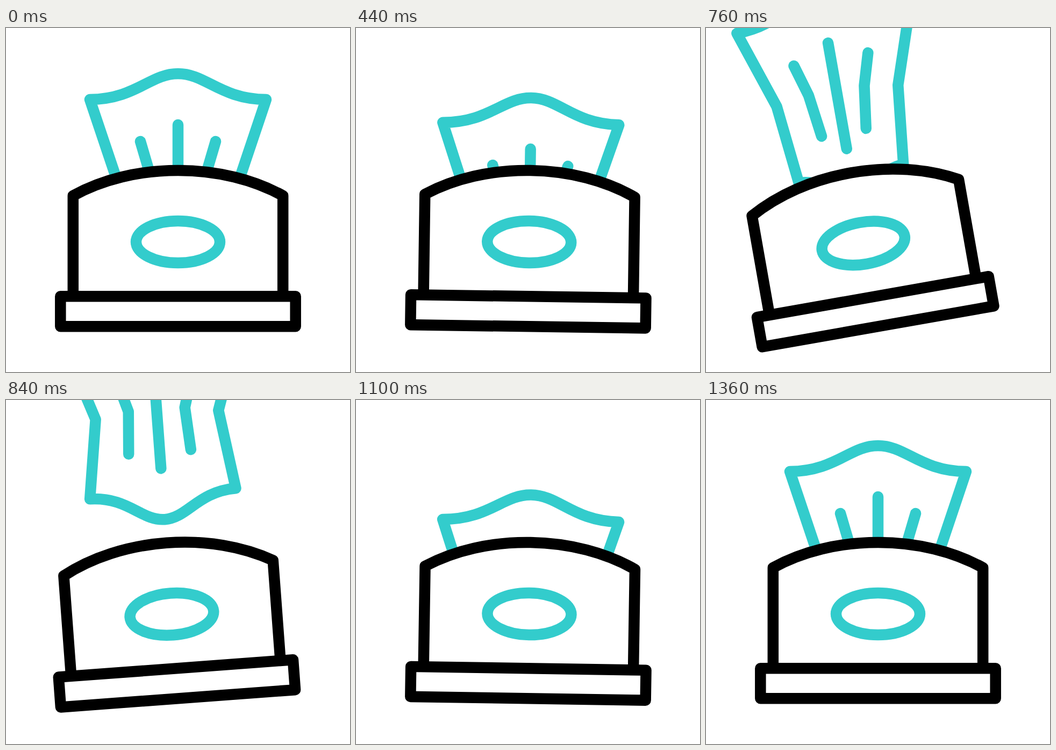
Recreate the animation shown at these times as an HTML page. Size 640x640 px, loop 1.72 s.

```html
<!DOCTYPE html>
<html lang="en">
<head>
<meta charset="utf-8">
<title>Tissue box</title>
<style>
  html, body { margin: 0; width: 100%; height: 100%; overflow: hidden; background: #fff; }
  svg { display: block; width: 100vw; height: 100vh; }
  svg * { stroke-width: 20.5; stroke-linecap: round; stroke-linejoin: round; }
  .teal { stroke: #33cccc; fill: #fff; }
  .line { stroke: #33cccc; fill: none; }
  .box { stroke: #000; fill: #fff; }
</style>
</head>
<body>
<svg viewBox="0 0 640 640">
  <defs>
    <clipPath id="slot"><rect x="-400" y="-700" width="1440" height="1100"/></clipPath>
  </defs>
  <g id="all">
    <g clip-path="url(#slot)">
      <g id="next"><path class="teal"/><path class="line"/></g>
      <g id="sheet"><path class="teal"/><path class="line"/></g>
    </g>
    <path class="box" d="M124.8 499V312C179 282 247 265 320 265S461 282 515.2 312V499"/>
    <rect class="box" x="101.3" y="499.3" width="437.4" height="56"/>
    <ellipse class="teal" cx="320" cy="398" rx="78" ry="39"/>
  </g>
</svg>
<script>
const LOOP = 1720, STEP = 20, END = 1360;
const [all, sheet, next] = ['all', 'sheet', 'next'].map((id) => document.getElementById(id));
const ramp = (t, from, to) => Math.max(0, Math.min(1, (t - from) / (to - from)));

// The box rocks at an even pace between these [time, angle] points.
const swings = [[0, 0], [390, 2.5], [760, -10], [957, 4.2], [1225, -2], [END, 0]];

function tilt(t) {
  return swings.slice(1).reduce((angle, [time, to], i) =>
    angle + (to - swings[i][1]) * ramp(t, swings[i][0], time), 0);
}

// The sheet sinks a little, gathers speed, then flies off evenly.
function pull(t) {
  const from = 476, to = 692, speed = 1.167;
  const speedUp = (to - from) / 2 * ramp(t, from, to) ** 2;
  return 45 * ramp(t, 0, 390) - speed * (speedUp + Math.max(0, t - to));
}

// The next sheet slows down as it settles.
const rise = (t) => 91.5 * (Math.max(0, END - t) / 260) ** 1.235;

// Wavy hem of half width w; side 1 is the top, -1 the same hem turned around.
function hem(w, side) {
  const pt = (x, y) => `${side * x * w} ${side * y}`;
  return `${pt(-1, -147)}C${pt(-.476, -148)} ${pt(-.317, -195)} ${pt(0, -195)}` +
    `S${pt(.476, -148)} ${pt(1, -147)}`;
}

// open: 0 = lower half folded in, 1 = flared like the upper half
function drawSheet(g, y, open) {
  const waist = 114.6, w = 98.8 + 65.2 * open, foot = 42 + 28 * open;
  const pleat = (s) => `M${s * 70} -69L${s * 52.6} -10L${s * foot} 69`;
  const [edge, pleats] = g.children;
  edge.setAttribute('d', `M${hem(164, 1)}L${waist} 0L${hem(w, -1)}L${-waist} 0Z`);
  pleats.setAttribute('d', `M0 -100V100${pleat(-1)}${pleat(1)}`);
  g.setAttribute('transform', `translate(320 ${280 + y})`);
}

function draw(t) {
  all.setAttribute('transform', `rotate(${tilt(t)} 320 555)`);
  drawSheet(sheet, pull(t), ramp(t, 760, 900));
  drawSheet(next, rise(t), 0);
}

const start = performance.now();
function tick(now) {
  const t = Math.max(0, now - start) % LOOP;
  draw(Math.floor(t / STEP) * STEP);
  requestAnimationFrame(tick);
}
draw(0);
requestAnimationFrame(tick);
</script>
</body>
</html>
```
